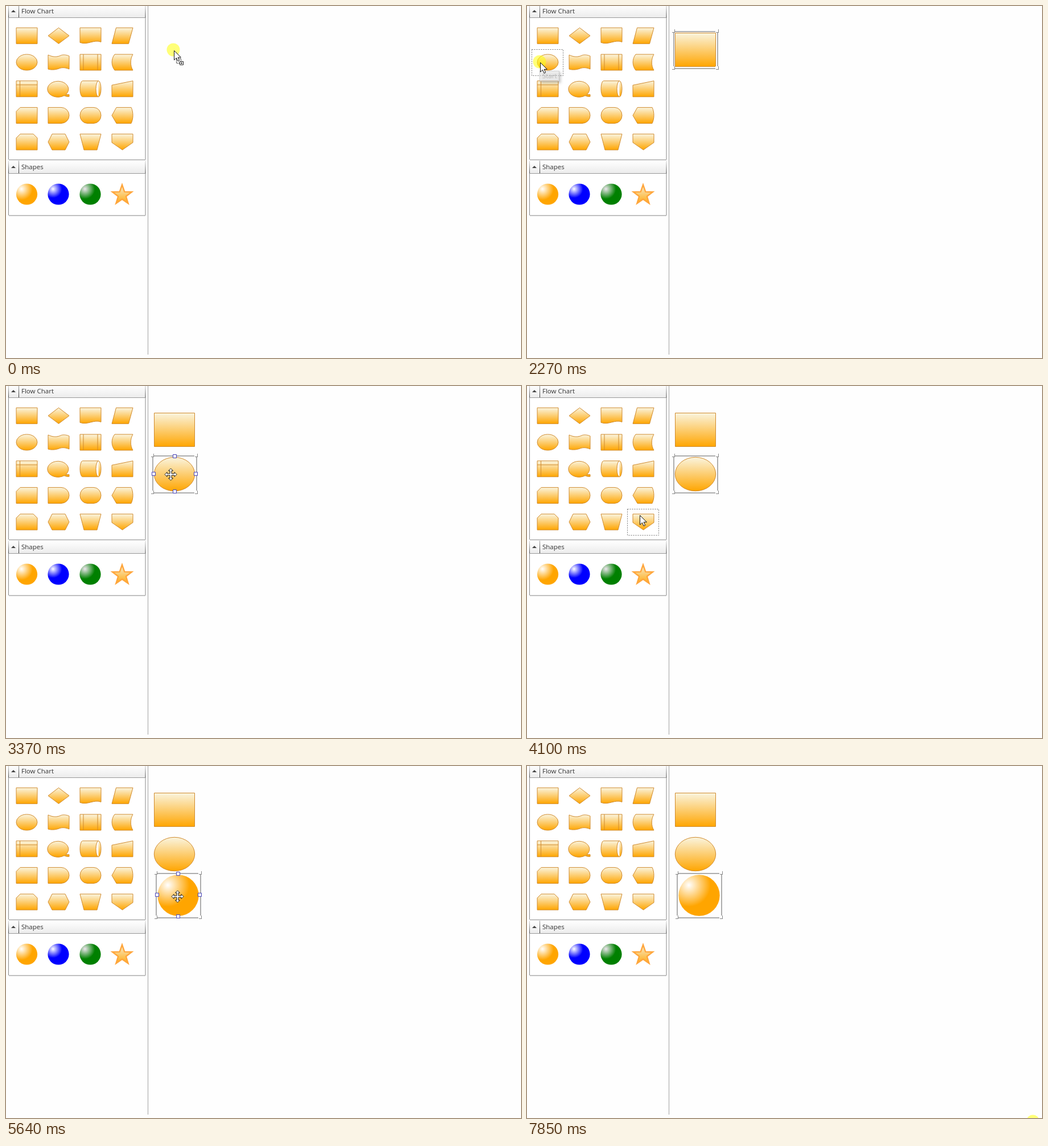
Write an HTML page with a canvas that moves like this. It is 905 by 619 pixels and loops after 7920 ms.

```html
<!DOCTYPE html>
<html lang="en">
<head>
<meta charset="utf-8">
<title>Flow chart drag and drop</title>
<style>
  html, body { margin: 0; width: 100%; height: 100%; overflow: hidden; background: #fefefe; }
  canvas { display: block; }
</style>
</head>
<body>
<canvas id="stage" width="905" height="619"></canvas>
<script>
const ctx = document.getElementById('stage').getContext('2d');
const LOOP = 7920;
const FONT = '11.5px "Open Sans", sans-serif';
const OUTLINE = '#d08a2c';

// Palette items, each in a 37 x 28 box, row by row.
const ITEMS = [
  'M0 0H37V28H0Z',
  'M18.5 0L37 14L18.5 28L0 14Z',
  'M0 0H37V25C24 20 14 31 0 26Z',
  'M7.5 0H37L29.5 28H0Z',
  'M0 14A18.5 14 0 0 1 37 14A18.5 14 0 0 1 0 14Z',
  'M0 1C10 6 18 4 22 2S33 1 37 3V26C30 23 24 23 19 25S6 28 0 26Z',
  'M0 0H37V28H0ZM6 0V28M31 0V28',
  'M5 0H37C32 8 32 20 37 28H5C-1.5 20 -1.5 8 5 0Z',
  'M0 0H37V28H0ZM6.5 0V28M0 7H37',
  'M31 24A18.5 14 0 1 0 28 26L33 27.5H37V24Z',
  'M4.5 0H32.5A4.5 14 0 0 1 32.5 28H4.5A4.5 14 0 0 1 4.5 0ZM32.5 0A4.5 14 0 0 0 32.5 28',
  'M0 7.5L37 0V28H0Z',
  'M7 0H37V28H0V7Z',
  'M0 0H23A14 14 0 0 1 23 28H0Z',
  'M13 0H24A13 14 0 0 1 24 28H13A13 14 0 0 1 13 0Z',
  'M8 0H34C38 8 38 20 34 28H8L0 14Z',
  'M7 0H30L37 7V28H0V7Z',
  'M7 0H30L37 14L30 28H7L0 14Z',
  'M0 0H37L30 28H7Z',
  'M0 0H37V15L18.5 28L0 15Z'
].map(d => new Path2D(d));

const ARROW = new Path2D('M0 0V16.5L3.9 12.8L6.6 18.6L9.2 17.4L6.6 11.8H11.8Z');
const MOVE = new Path2D('M0-10.5L4-6.5H1.5V-1.5H6.5V-4L10.5 0L6.5 4V1.5H1.5V6.5H4' +
  'L0 10.5L-4 6.5H-1.5V1.5H-6.5V4L-10.5 0L-6.5-4V-1.5H-1.5V-6.5H-4Z');

// Shapes dropped on the canvas: time and bounds.
const DROPS = [
  { at: 720, x: 260, y: 47, w: 72, h: 60, draw: drawBox },
  { at: 3370, x: 260, y: 125, w: 72, h: 60, draw: drawEllipse },
  { at: 5640, x: 266, y: 191, w: 73, h: 73,
    draw: s => drawBall(s.x + 36.5, s.y + 36.5, 36.2, '#ffa500', 1.05) }
];

// Pointer path: time, x, y.
const TRACK = [
  [0, 294, 77], [1381, 294, 77], [1450, 265, 80], [2070, 22, 98], [2270, 22, 98],
  [2820, 289, 155], [3766, 289, 155], [4580, 35, 349], [4650, 35, 349],
  [4700, 147, 324], [4900, 250, 270], [5180, 301, 229], [6719, 301, 229],
  [6720, 302, 229], [6982, 302, 229], [7590, 889, 625], [LOOP, 889, 625]
];
// Start and length of the pointer's sampling steps.
const STEPS = [[0, 70], [1450, 620 / 9], [2270, 550 / 8], [3840, 74], [4650, 50],
  [4700, 480 / 7], [6720, 55], [7050, 67.5]];
const PRESSES = [[0, 720], [2270, 3370], [4650, 5640], [7790, LOOP]];

function pointerAt(time) {
  const [start, step] = STEPS.filter(s => s[0] <= time).pop();
  const t = start + Math.floor((time - start) / step + 0.001) * step;
  const i = Math.max(1, TRACK.findIndex(k => k[0] >= t));
  const [t0, x0, y0] = TRACK[i - 1], [t1, x1, y1] = TRACK[i];
  const p = (t - t0) / (t1 - t0);
  return { x: Math.round(x0 + (x1 - x0) * p), y: Math.round(y0 + (y1 - y0) * p) };
}

function vertical(y0, y1, top, bottom) {
  const g = ctx.createLinearGradient(0, y0, 0, y1);
  g.addColorStop(0, top);
  g.addColorStop(1, bottom);
  return g;
}

function line(x0, y0, x1, y1, color, width = 1) {
  ctx.strokeStyle = color;
  ctx.lineWidth = width;
  ctx.beginPath();
  ctx.moveTo(x0, y0);
  ctx.lineTo(x1, y1);
  ctx.stroke();
}

function paint(path, fill, stroke, width = 1) {
  ctx.fillStyle = fill;
  ctx.strokeStyle = stroke;
  ctx.lineWidth = width;
  ctx.fill(path);
  ctx.stroke(path);
}

function paintAt(x, y, path, fill, stroke, width) {
  ctx.save();
  ctx.translate(x, y);
  paint(path, fill, stroke, width);
  ctx.restore();
}

function square(x, y, w, h, fill, stroke) {
  const path = new Path2D();
  path.rect(x, y, w, h);
  paint(path, fill, stroke);
}

const orange = (y, h) => vertical(y, y + h, '#faf5e0', '#ffa500');

function drawBox(s) {
  square(s.x + 0.5, s.y + 0.5, s.w - 1, s.h - 1, orange(s.y, s.h), OUTLINE);
}

function drawEllipse(s) {
  const path = new Path2D();
  path.ellipse(s.x + s.w / 2, s.y + s.h / 2, s.w / 2 - 0.3, s.h / 2 - 0.3, 0, 0, 7);
  paint(path, orange(s.y, s.h), OUTLINE);
}

function drawBall(x, y, r, color, spread, shine = '#fff') {
  const fx = x - r * 0.5, fy = y - r * 0.5;
  const g = ctx.createRadialGradient(fx, fy, 0, fx, fy, r * spread);
  g.addColorStop(0, shine);
  g.addColorStop(1, color);
  ctx.fillStyle = g;
  ctx.beginPath();
  ctx.arc(x, y, r, 0, 7);
  ctx.fill();
}

function drawStar(x, y, r) {
  const path = new Path2D();
  for (let i = 0; i < 10; i++) {
    const a = i * Math.PI / 5 - Math.PI / 2, d = i % 2 ? r * 0.4 : r;
    path.lineTo(x + d * Math.cos(a), y + d * Math.sin(a));
  }
  path.closePath();
  paint(path, vertical(y - r, y + r, '#f8ecd0', '#ffa500'), '#ffa63c', 2.4);
}

function drawPanel(title, top, headerEnd, bottom) {
  ctx.fillStyle = '#fff';
  ctx.fillRect(4, top, 241, bottom - top);
  ctx.fillStyle = vertical(top, headerEnd, '#fff', '#ececec');
  ctx.fillRect(5, top, 240, headerEnd - top);
  line(4.5, top, 4.5, headerEnd, vertical(top, headerEnd, '#ddd', '#444'));
  line(245, top, 245, headerEnd, vertical(top, headerEnd, '#ddd', '#444'));
  line(22.5, top, 22.5, headerEnd, vertical(top, headerEnd, '#aaa', '#333'));
  line(4, headerEnd + 0.5, 245.5, headerEnd + 0.5, '#999');
  line(4.5, headerEnd, 4.5, bottom, '#888');
  line(245, headerEnd, 245, bottom, '#888');
  line(5, bottom + 0.5, 245, bottom + 0.5, '#aaa', 1.5);
  const mid = headerEnd - 11;
  ctx.fillStyle = '#444';
  ctx.fill(new Path2D(`M9 ${mid + 2}L13 ${mid - 2}L17 ${mid + 2}Z`));
  ctx.font = FONT;
  ctx.fillStyle = '#333';
  ctx.fillText(title, 27, mid + 4);
}

function drawPalette() {
  drawPanel('Flow Chart', -2, 20, 270);
  drawPanel('Shapes', 272, 294, 368);
  ITEMS.forEach((path, i) =>
    paintAt(18 + i % 4 * 56, 38.3 + Math.floor(i / 4) * 46.7, path, orange(0, 28), OUTLINE));
  drawBall(36.5, 331, 18.6, '#ffa500', 1.05);
  drawBall(92, 331, 18.6, '#00f', 0.85);
  drawBall(148, 331, 18.6, '#008000', 0.95, '#eee6ee');
  drawStar(204, 332.5, 18);
  line(249.5, 0, 249.5, 613, '#bbb', 1.5);
}

// Dotted frame around the palette cell below the pointer.
function drawHoverCell({ x, y }) {
  const col = Math.floor((x - 8) / 56), row = Math.floor((y - 29) / 46.7);
  const ball = y > 303 && y < 359;
  if (col < 0 || col > 3 || !(ball || (row >= 0 && row < 5))) return;
  ctx.save();
  ctx.setLineDash([2, 2]);
  ctx.strokeStyle = '#777';
  ctx.lineWidth = 1;
  const top = ball ? 303.5 : Math.round(29 + row * 46.7) + 0.5;
  ctx.strokeRect(8.5 + col * 56, top, 55, ball ? 55 : 46);
  ctx.restore();
}

function drawTooltip() {
  ctx.save();
  ctx.globalAlpha = 0.5;
  ctx.shadowColor = 'rgba(0,0,0,.35)';
  ctx.shadowBlur = 4;
  ctx.shadowOffsetX = ctx.shadowOffsetY = 2;
  square(22.5, 114.5, 34, 18, '#fff', '#aaa');
  ctx.shadowColor = 'transparent';
  ctx.fillStyle = '#888';
  ctx.font = FONT;
  ctx.fillText('Start', 27, 127);
  ctx.restore();
}

function drawSelection(s, withHandles) {
  const left = s.x - 2, top = s.y - 2, right = s.x + s.w + 3, bottom = s.y + s.h + 3;
  ctx.strokeStyle = '#999';
  ctx.lineWidth = 1.6;
  ctx.strokeRect(left, top, right - left, bottom - top);
  for (const x of [left, right]) for (const y of [top, bottom]) {
    ctx.fillStyle = '#fefefe';
    ctx.fillRect(x - 4, y - 4, 6, 6);
    line(x - 3, y + 1.5, x + 2, y + 1.5, '#888');
    line(x + 1.5, y - 4, x + 1.5, y + 2, '#888');
  }
  if (!withHandles) return;
  const cx = s.x + s.w / 2, cy = s.y + s.h / 2;
  for (const [x, y] of [[cx, s.y - 1], [cx, s.y + s.h + 1], [s.x - 1, cy], [s.x + s.w + 1, cy]])
    square(Math.floor(x) - 2.5, Math.floor(y) - 3.5, 6, 6, '#f4f4ff', '#4b45b5');
}

function drawForbidden(x, y) {
  const ring = new Path2D();
  ring.arc(x, y, 6.8, 0, 7);
  ring.moveTo(x - 4.8, y - 4.8);
  ring.lineTo(x + 4.8, y + 4.8);
  paint(ring, 'rgba(255,215,60,.85)', '#e0640c', 2);
}

function drawCopyBadge(x, y) {
  ctx.save();
  ctx.setLineDash([2, 1]);
  square(x + 5.5, y + 15.5, 8, 8, '#fff', '#222');
  ctx.restore();
  square(x + 11.5, y + 20.5, 6, 6, '#fff', '#222');
  line(x + 13, y + 23.5, x + 16, y + 23.5, '#222');
  line(x + 14.5, y + 22, x + 14.5, y + 25, '#222');
}

function drawPointer({ x, y }, pressed, dragging, overShape) {
  if (pressed) {
    ctx.fillStyle = 'rgba(255,255,0,.53)';
    ctx.beginPath();
    ctx.arc(x, y, 11.5, 0, 7);
    ctx.fill();
  }
  if (overShape) return paintAt(x + 0.5, y + 0.5, MOVE, '#fff', '#111');
  if (dragging && x < 250) return drawForbidden(x, y);
  if (dragging) drawCopyBadge(x, y);
  paintAt(x + 1.5, y + 1.5, ARROW, '#fff', '#111');
}

function draw(time) {
  ctx.fillStyle = '#fefefe';
  ctx.fillRect(0, 0, 905, 619);
  drawPalette();

  const pointer = pointerAt(time);
  const press = PRESSES.find(([from, to]) => time >= from && time < to);
  const dragging = !!press && time < 7000 && (press[0] === 0 || time >= press[0] + 50);
  const dropped = DROPS.filter(s => time >= s.at);
  dropped.forEach(s => s.draw(s));

  const selected = dropped[dropped.length - 1];
  const overShape = !!selected && !press &&
    pointer.x >= selected.x && pointer.x <= selected.x + selected.w &&
    pointer.y >= selected.y && pointer.y <= selected.y + selected.h;
  if (selected) drawSelection(selected, overShape);
  if (!dragging) drawHoverCell(pointer);
  if (time >= 2270 && time < 2320) drawTooltip();
  drawPointer(pointer, press, dragging, overShape);
}

function tick() {
  draw(performance.now() % LOOP);
  requestAnimationFrame(tick);
}
tick();
</script>
</body>
</html>
```
